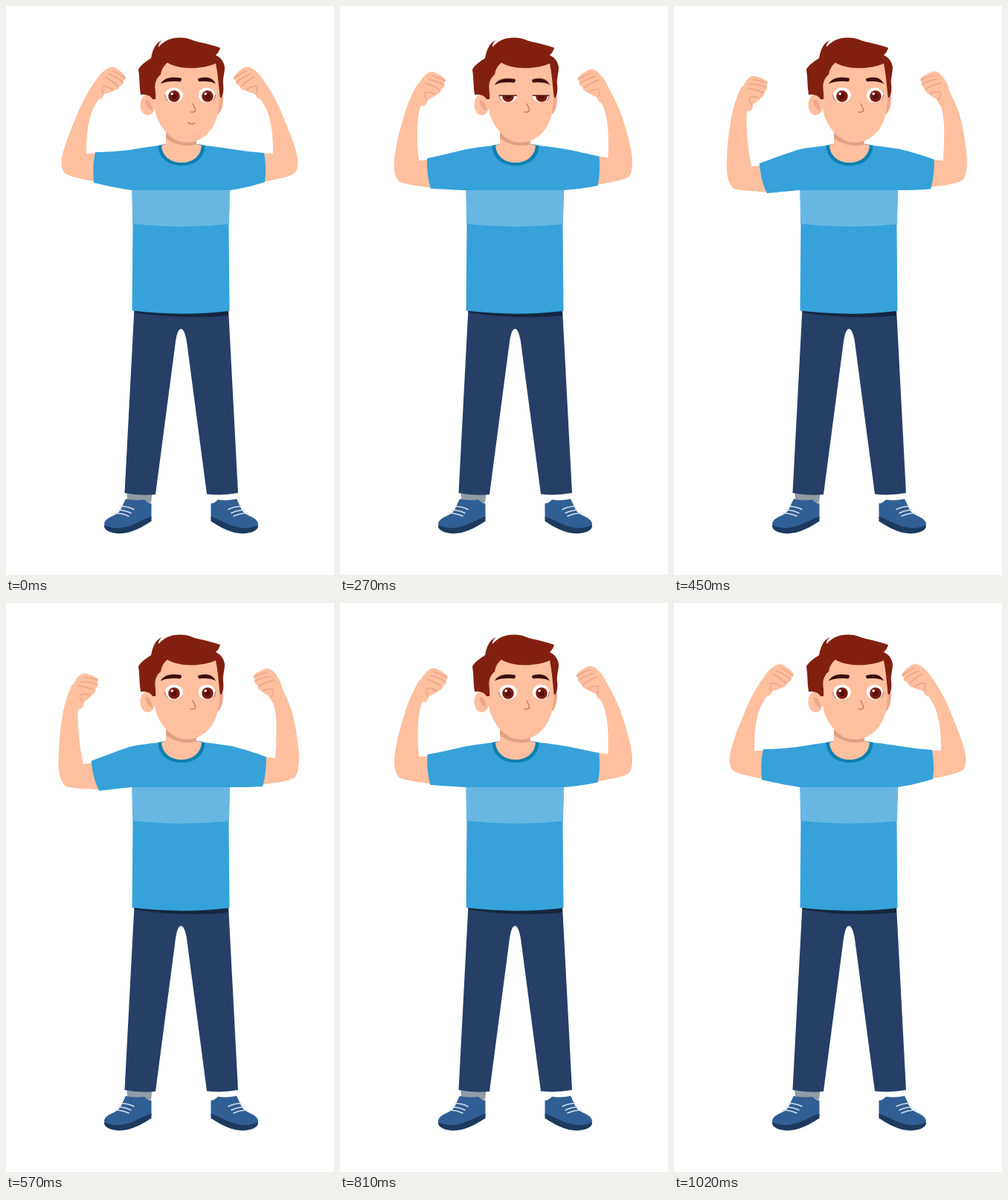
Animation of 441x763 px, one loop 1.05 s. Source, as an HTML page without scripts:

```html
<!DOCTYPE html>
<html lang="en">
<head>
<meta charset="utf-8">
<title>Flexing arms</title>
<style>
html, body { margin: 0; width: 100%; height: 100%; overflow: hidden; background: #fff; }
svg { display: block; width: 100%; height: 100%; }

.skin { fill: #ffc09f; }
.crease { fill: none; stroke: #e09a7c; stroke-width: 1.1; stroke-linecap: round; stroke-linejoin: round; }
.shirt { fill: #36a2d9; }
.hair { fill: #82200f; }
.brow { fill: #3c0d0b; }
.rim { fill: none; stroke: #8a5444; stroke-width: .8; }

/* arms and sleeves: one slow swing per loop */
.swing { animation: 1050ms cubic-bezier(.37, 0, .63, 1) infinite; }
.armL { animation-name: armL; }
.armR { animation-name: armR; }
.sleeves { animation-name: sleeves; }
.hand { animation-name: hand; transform-origin: 144px 100px; }
.left { --x: -35px; --y: 12px; --turn: -21deg; }
.right { --x: -25.5px; --y: 5.7px; --turn: -14deg; }

@keyframes armL {
  51% { d: path("M128 214 L104 216 C100 200 98 184 97 166 C96 154 96 143 98 133 L108 118 L89 109 C82 122 77 141 75 156 C72 172 71 193 70.5 214 C70 228 74 240 80 246 C88 249 108 249 130 251 Z"); }
}
@keyframes armR {
  51% { d: path("M128 205 L105 208 C104 192 103 176 103.5 160 C104 150 105 142 108 133 L122 113 L103 101 C95 115 87 132 83 144 C78 160 74 188 73 206 C73 218 74 228 79 234 C89 240 106 241 128 244 Z"); }
}
@keyframes sleeves {
  51% { d: path("M206 187 C190 189 178 190 166 193 C148 199 130 206 114.5 212 C116 226 119 240 125.5 252 C142 250 158 248 169 247 L301 247 C316 247 330 247 345 246 C349 232 350 219 350 206.5 C336 201 320 196 304 192 C290 190 280 188 266 187 Z"); }
}
@keyframes hand {
  51% { transform: translate(var(--x), var(--y)) rotate(var(--turn)); }
}

/* face */
.lid, .brows { animation: 1050ms cubic-bezier(.37, 0, .63, 1) infinite; }
.lid { animation-name: blink; }
.brows { animation-name: frown; }
.mouth { animation: mouth 1050ms step-end infinite; }

@keyframes blink {
  0%, 2.86%, 37.2%, 100% { transform: none; }
  15.7% { transform: translateY(22px); }
}
@keyframes frown {
  0%, 2.86%, 37.2%, 100% { transform: none; }
  15.7% { transform: translateY(2.5px); }
}
@keyframes mouth {
  0% { visibility: visible; }
  2.86%, 100% { visibility: hidden; }
}
</style>
</head>
<body>
<svg viewBox="0 0 441 763">
  <defs>
    <g id="fist">
      <path class="skin" d="M122 98 C126 91 133 86 137 83.500 C141 81 146 81 149 84 C154 87 158 91 160 94 C162 97 160 99 158 100 C159 103 157 106 153 107 C152 111 148 113 145 113 C141 116 136 117 132 118 C131 122 129 125 124 125 L112 116 Z"/>
      <path class="crease" d="M144 87 Q153 91 160 97 M138 91 Q149 95 157 102 M133 95 Q143 100 151 108 M131 107 Q139 108 144 113 M131 107 Q128 112 131 118"/>
    </g>
    <g id="shoe">
      <path fill="#305f95" d="M161 661 Q174 664 186 662 C189 665 192 667 195.500 667 V687 C183 693 170 703 152 704 C139 703 132 699 132 694 C133 688 141 685 149 681 C155 677 157 668 161 661 Z"/>
      <path fill="#1c3a5e" d="M132 696 C141 701 153 701 163 698 C177 694 186 687 195.500 685 V691 C188 695 173 707 152 707.500 C139 707 131 702 132 696 Z"/>
      <path fill="none" stroke="#d5dee8" stroke-width="1.600" stroke-linecap="round" d="M155 671 Q164 671 172 675 M151 676 Q160 676 168 680 M146 680 Q156 680 165 684"/>
    </g>
    <ellipse id="ballL" cx="226" cy="119.500" rx="12" ry="10.300"/>
    <ellipse id="ballR" cx="270" cy="119.500" rx="11.200" ry="10.300"/>
    <clipPath id="eyeL"><use href="#ballL"/></clipPath>
    <clipPath id="eyeR"><use href="#ballR"/></clipPath>
    <g id="iris">
      <circle r="7.800" fill="#7e1c10"/>
      <circle r="4" fill="#560f0a"/>
      <circle cx="-2.800" cy="-3.200" r="1.800" fill="#fff"/>
    </g>
    <g id="lid">
      <path class="skin" d="M208 80 H288 V108 H208 Z"/>
      <path d="M208 108 H288" stroke="#4a1710" stroke-width="1.500"/>
    </g>
  </defs>

  <!-- legs -->
  <path fill="#929ba5" d="M162 650 H197 L195 666 Q178 668 163 661 Z"/>
  <use href="#shoe"/>
  <use href="#shoe" transform="translate(471 0) scale(-1 1)"/>
  <path fill="#253f67" d="M172.500 406 H299 L312 653 Q291 657 270 654.500 L243 450 C241 438 238 433 235.500 433 C232 433 230 438 228 450 L201 655 Q180 657 159.500 653 Z"/>
  <path fill="#15263f" d="M172.500 406 H299 V415 Q236 421 172.500 411 Z"/>

  <!-- arms -->
  <g class="left">
    <path class="skin swing armL" d="M130 197 L108 198 C108 182 109 165 112 154 C114 146 116 139 121 131 L136 108 L122 98 C110 114 101 132 95 147 C87 166 78 188 75 204 C74 213 75 221 80 225 C89 230 108 233 130 238 Z"/>
    <use class="swing hand" href="#fist"/>
  </g>
  <g class="right" transform="translate(467 0) scale(-1 1)">
    <path class="skin swing armR" d="M130 197 L108 198 C108 182 109 165 112 154 C114 146 116 139 121 131 L136 108 L122 98 C110 114 101 132 95 147 C87 166 78 188 75 204 C74 213 75 221 80 225 C89 230 108 233 130 238 Z"/>
    <use class="swing hand" href="#fist"/>
  </g>

  <!-- shirt -->
  <path class="shirt" d="M169.500 246 H301 L299.500 293 L300.500 409 Q236 416.500 169.500 408.500 L170.500 293 Z"/>
  <path class="shirt swing sleeves" d="M206 187 C190 189 178 191 166 193 C150 195 135 196 120 196 C117 210 117 222 118 237 C135 241 155 245 169 247 L301 247 C315 245 333 241 348 236 C350 222 349 210 347 197 C332 196 318 194 304 192 C290 190 280 188 266 187 Z"/>
  <path fill="#68b7e3" d="M169.500 247 H301 L300 292.500 Q236 299 170 292 Z"/>
  <path fill="#0d80b0" d="M204.500 187 L215 185 H257 L267.500 187 C267 204 254 214 236 214 C218 214 205 204 204.500 187 Z"/>
  <path class="skin" d="M209 187 L215 185 V160 H256 V185 L263 187 C262 202 250 210 236 210 C222 210 210 202 209 187 Z"/>
  <path fill="#dfa184" d="M215 170 H256 V186 C241 189 226 186 215 177 Z"/>

  <!-- head -->
  <ellipse class="skin" cx="190.500" cy="132.500" rx="10" ry="14"/>
  <path fill="#f0a587" d="M187 126 C192 125 196 131 197 141 C192 139 188 134 187 126 Z"/>
  <path fill="#f0a587" d="M284 122 H292 C292 134 289 143 284 146 Z"/>
  <path class="skin" d="M201 70 H285 L287 122 C287 140 284 156 273 169 C262 181 250 184 237 182.500 C222 180 208 164 202 147 C199 135 199 125 199 90 Z"/>
  <path class="hair" d="M201 125 L197 125 C194 120 189 118 181 119 C179 108 180 97 178 85 C182 78 189 74 195 70 C197 60 200 50 210 45.500 C206 49 205 52 205 55 C213 46 223 42 234 42.500 C244 42 250 46 258 48 C269 50 279 53 288 56 C287 60 285 63 282 66 C289 69 293 75 294 82 C294 91 291 98 292 105 C293 112 292 118 290 123 L287.500 122 C286 107 285 91 282 77 C271 82 256 84 243 83 C232 82.500 224 80 217 76 C212 80 209 85 208 92 C204 95 201 100 200.500 106 C200 112 202 118 201 125 Z"/>

  <!-- eyes -->
  <g clip-path="url(#eyeL)">
    <use href="#ballL" fill="#fff"/>
    <use href="#iris" x="226" y="121"/>
    <use class="lid" href="#lid"/>
  </g>
  <g clip-path="url(#eyeR)">
    <use href="#ballR" fill="#fff"/>
    <use href="#iris" x="271" y="121"/>
    <use class="lid" href="#lid"/>
  </g>
  <path class="rim" d="M213.500 119 Q214 125 218 127 M281.500 119 Q281 125 278 127"/>

  <g class="brows">
    <path class="brow" d="M208 104.500 C212 95.500 224 94.500 235 96.500 Q237.500 99 234 101.500 C224 100.500 215 101 208 104.500 Z"/>
    <path class="brow" d="M282 104.500 C278 95.500 269 94.500 259 97 Q256.500 99 260 101.500 C268 100.500 276 101 282 104.500 Z"/>
  </g>
  <path class="crease" style="stroke:#b9694c" d="M251 131 C253 135 255 138 254.500 141 Q252 143 248 142"/>
  <path class="crease mouth" style="stroke:#b9694c" d="M244.500 156 Q249 160 254 157"/>
</svg>
</body>
</html>
```
